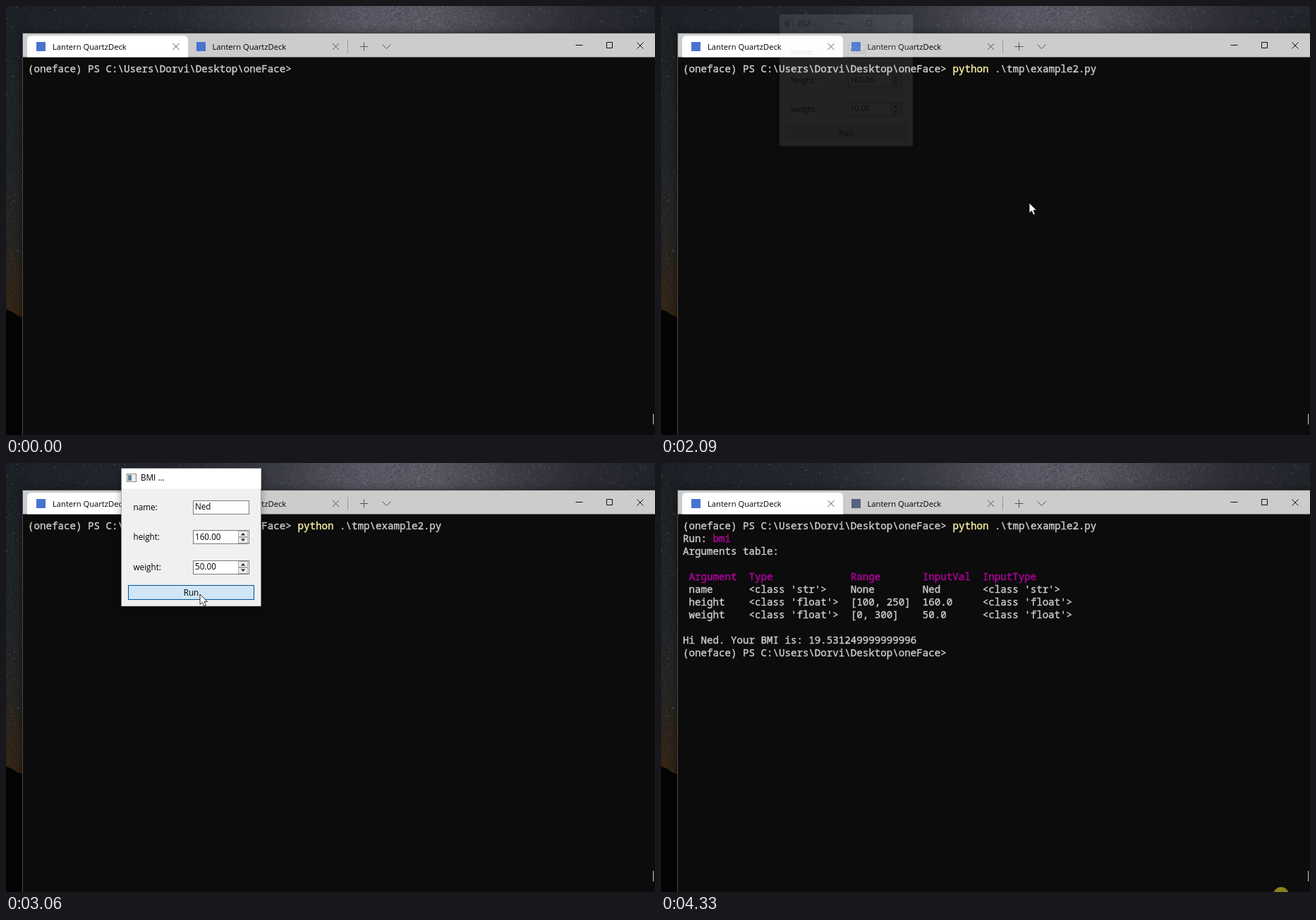
Recreate the animation shown at these times as an HTML page with a canvas. Size 920 by 608 pixels, loop 4400 ms.

```html
<!DOCTYPE html>
<html lang="en">
<head>
<meta charset="utf-8">
<title>Terminal and form</title>
<style>
  html, body { margin: 0; width: 100%; height: 100%; overflow: hidden; background: #000; }
  canvas, svg { position: absolute; left: 0; top: 0; width: 920px; height: 608px; }
  text { white-space: pre; }
  .ui { font: 11.2px "Open Sans", "Noto Sans", sans-serif; fill: #000; }
  .form { font: 11.7px "Open Sans", "Noto Sans", sans-serif; fill: #000; }
  .term {
    font: 500 14.167px "Noto Sans Mono", "DejaVu Sans Mono", monospace;
    color: #ccc; fill: currentColor; stroke-width: .4px;
  }
  .term text, .term tspan { fill: currentColor; stroke: currentColor; }
  .line { fill: none; stroke: #111; }
  .soft { fill: none; stroke: #555; }
  .box { fill: #fff; stroke: #7a7a7a; }
  .hot { color: #b4009e; }
  .cmd { color: #f9f1a5; }
  #win { filter: drop-shadow(0 1px 6px rgba(0, 0, 0, .55)); }
  #dialog { filter: drop-shadow(0 3px 6px rgba(0, 0, 0, .35)); }
</style>
</head>
<body>
<canvas id="sky" width="920" height="608"></canvas>
<svg viewBox="0 0 920 608">
  <defs>
    <path id="cross" d="M-4.5-4.5 4.5 4.5M-4.5 4.5 4.5-4.5"/>
    <g id="spin">
      <rect x="329.5" y="1.5" width="13" height="8" fill="#eee" stroke="#aaa"/>
      <rect x="329.5" y="10.5" width="13" height="8" fill="#eee" stroke="#aaa"/>
      <path d="M333 7.500h6l-3-3.500zM333 12.500h6l-3 3.500z" fill="#222"/>
    </g>
  </defs>

  <g id="win">
    <rect x="23" y="38" width="920" height="600" fill="#4a4a4a"/>
    <rect x="24" y="39" width="920" height="34" fill="#ccc"/>
    <rect x="24" y="72.500" width="920" height="560" fill="#0c0c0c"/>
  </g>
  <path d="M30 72.500V48q0-6 6-6h216q6 0 6 6v24.500z" fill="#fff"/>
  <rect x="43" y="51" width="13" height="13" fill="#4674cf"/>
  <rect id="icon2" x="270" y="51" width="13" height="13"/>
  <g class="ui">
    <text x="66" y="62">Lantern QuartzDeck</text>
    <text x="292.500" y="62">Lantern QuartzDeck</text>
  </g>
  <g class="soft">
    <use href="#cross" x="241" y="57.500"/>
    <use href="#cross" x="467.500" y="57.500"/>
    <path d="M501.500 57.500h12M507.500 51.500v12M533.500 54.500l6 6 6-6"/>
    <path d="M484.500 48v19" stroke="#999"/>
  </g>
  <g class="line">
    <path d="M807.500 55.500h10M851.500 51.500h8v8h-8z"/>
    <use href="#cross" x="899" y="56"/>
  </g>
  <rect x="917" y="578" width="1.200" height="15" fill="#bbb"/>

  <g id="term" class="term"></g>
  <rect id="caret" width="1.200" height="17" fill="#fff"/>

  <g id="dialog">
    <rect x="163.500" y="7.500" width="198" height="195.500" fill="#f0f0f0" stroke="#777" stroke-opacity=".5"/>
    <rect x="164" y="8" width="197.500" height="28.500" fill="#fff"/>
    <rect x="171.500" y="15.500" width="13" height="11" fill="#e8eef2" stroke="#888"/>
    <rect x="173" y="17" width="5" height="8" fill="#5f7f91"/>
    <g id="buttons" class="line">
      <path d="M249 21.500h10M292.500 16.500h8v8h-8z"/>
      <use href="#cross" x="340" y="21"/>
    </g>
    <rect id="name" class="box" x="265.500" y="53.500" width="79" height="19"/>
    <rect class="box" x="265.500" y="95.500" width="79" height="19"/>
    <rect class="box" x="265.500" y="138.500" width="79" height="19"/>
    <use href="#spin" y="95"/>
    <use href="#spin" y="138"/>
    <rect id="run" x="173.500" y="173.500" width="178" height="20"/>
    <g class="form">
      <text x="191" y="25">BMI ...</text>
      <text x="180.500" y="67">name:</text>
      <text x="180.500" y="109">height:</text>
      <text x="180.500" y="152">weight:</text>
      <text x="268" y="66">Ned</text>
      <text x="268" y="109">160.00</text>
      <text x="268" y="151">50.00</text>
      <text x="262.500" y="188" text-anchor="middle">Run</text>
    </g>
    <rect id="nameCaret" x="291" y="56" width="1" height="13"/>
  </g>

  <circle id="click" cx="879" cy="612" r="11" fill="#8a8120"/>
  <path id="mouse" d="M0 0V14.500L3.300 11.500 6 17.200 8.400 16.100 5.900 10.600H10.500Z"
        fill="#fff" stroke="#000" stroke-width=".8"/>
</svg>

<script>
const LOOP = 4400, COL = 8.5, ROW = 18, LEFT = 31, TOP = 80;
const $ = id => document.getElementById(id);
const show = (id, on) => $(id).setAttribute("visibility", on ? "visible" : "hidden");
const attrs = (id, values) => {
  for (const key in values) $(id).setAttribute(key, values[key]);
};

// Night sky: gradients, seeded grain and a dark hill
function paintSky() {
  const c = $("sky").getContext("2d");
  let seed = 7;
  const rnd = () => (seed = seed * 16807 % 2147483647) / 2147483647;
  const fade = (x, y, stops) => {
    const g = c.createLinearGradient(0, 0, x, y);
    stops.forEach(([at, color]) => g.addColorStop(at, color));
    return g;
  };
  c.fillStyle = fade(920, 0, [[0, "#1b2026"], [.25, "#23262d"], [.42, "#3a3b45"], [.55, "#575561"],
    [.66, "#585661"], [.78, "#3d3c46"], [.9, "#292932"], [1, "#212329"]]);
  c.fillRect(0, 0, 920, 60);
  c.fillStyle = fade(0, 608, [[0, "#1b2026"], [.3, "#1e2325"], [.5, "#232423"], [.6, "#29231d"],
    [.7, "#322315"], [.75, "#2c1d10"]]);
  c.fillRect(0, 0, 30, 608);
  const grain = (x, y) => {
    const glow = Math.exp(-(((x - 570) / 130) ** 2));
    const v = rnd() < .5 ? 0 : 225;
    c.fillStyle = `rgba(${v},${v},${v + 12},${rnd() * (.05 + .08 * glow)})`;
    c.fillRect(x, y, 1 + rnd(), 1 + rnd());
  };
  for (let i = 0; i < 14000; i++) grain(rnd() * 920, rnd() * 40);
  for (let i = 0; i < 4500; i++) grain(rnd() * 24, 40 + rnd() * 400);
  c.fillStyle = "rgba(190,205,225,.4)";
  for (let i = 0; i < 30; i++) c.fillRect(rnd() * 920, rnd() * 38, 1.2, 1.2);
  for (let i = 0; i < 12; i++) c.fillRect(rnd() * 23, rnd() * 370, 1.2, 1.2);
  c.fillStyle = "#040405";
  c.beginPath();
  [[0, 430], [8, 433], [15, 438], [30, 444], [30, 608], [0, 608]].forEach(p => c.lineTo(...p));
  c.fill();
}

const PROMPT = "(oneface) PS C:\\Users\\Dorvi\\Desktop\\oneFace&gt;";
const tableRow = (a, b, c, d, e) =>
  " " + a.padEnd(10) + b.padEnd(17) + c.padEnd(12) + d.padEnd(10) + e;
const plain = s => s.replace(/</g, "&lt;").replace(/>/g, "&gt;");
const dataRow = (name, type, range, value) =>
  plain(tableRow(name, `<class '${type}'>`, range, value, `<class '${type}'>`));
const hot = s => `<tspan class="hot">${s}</tspan>`;
const line = (row, html, col = 0) =>
  `<text x="${LEFT + col * COL}" y="${TOP + 14.4 + row * ROW}">${html}</text>`;

function buildTerminal() {
  const output = [
    "Run: " + hot("bmi"),
    "Arguments table:",
    "",
    hot(tableRow("Argument", "Type", "Range", "InputVal", "InputType")),
    dataRow("name", "str", "None", "Ned"),
    dataRow("height", "float", "[100, 250]", "160.0"),
    dataRow("weight", "float", "[0, 300]", "50.0"),
    "",
    "Hi Ned. Your BMI is: 19.531249999999996"
  ];
  $("term").innerHTML = line(0, PROMPT) +
    `<g id="command">${line(0, '<tspan class="cmd">python</tspan> .\\tmp\\example2.py', 45)}</g>` +
    `<g id="output">${output.map((s, i) => line(i + 1, s)).join("")}</g>` +
    `<g id="prompt">${line(10, PROMPT)}</g>`;
}

// The screen refreshes in even steps: first, last, count
const RUNS = [[460, 890, 7], [2090, 2570, 8], [2640, 3150, 8], [3210, 3730, 8], [3800, 4070, 5]];
function snap(t) {
  let s = 0;
  for (const [a, b, n] of RUNS) {
    if (t < a) break;
    const step = (b - a) / (n - 1);
    s = a + Math.floor((Math.min(t, b) - a) / step + 1e-6) * step;
  }
  return s;
}

// Pointer: time, x, y, and the power of the easing (0 = smooth)
const PATH = [[460, 844, 585, 0], [890, 522, 279, 1], [2400, 522, 279, 0], [2930, 275, 186, 1],
  [3400, 275, 186, 1.3], [3730, 553, 352, 1], [4002, 845, 587, 1], [4070, 879, 612, 1]];
function pointer(s) {
  const i = PATH.findIndex(k => k[0] > s);
  if (i < 1) return i ? PATH[PATH.length - 1].slice(1, 3) : PATH[0].slice(1, 3);
  const [a, b] = [PATH[i - 1], PATH[i]];
  const u = (s - a[0]) / (b[0] - a[0]);
  const e = a[3] ? u ** a[3] : u * u * (3 - 2 * u);
  return [a[1] + (b[1] - a[1]) * e, a[2] + (b[2] - a[2]) * e];
}

// Text caret: from time on, at column and row (none = hidden)
const CARET = [[0], [890, 45, 0], [1350], [1420, 69, 0], [1620, 0, 1], [2090],
  [3150, 0, 10], [3284, 45, 10], [4330]];

function dialogLevel(s) {
  if (s < 2090) return 0;
  const e = s < 3150 ? 1 - Math.exp((2083 - s) / 69) : Math.exp((3140 - s) / 22);
  return e < .01 ? 0 : Math.min(1, e);
}

function render(t) {
  const s = snap(t);
  show("command", t >= 1350);
  show("output", t >= 3150);
  show("prompt", t >= 3284);

  const [, col, row] = CARET.filter(k => k[0] <= t).pop();
  show("caret", col !== undefined);
  if (col !== undefined) attrs("caret", { x: LEFT + col * COL, y: TOP + row * ROW - .5 });

  const level = dialogLevel(s), scale = .95 + .05 * level;
  attrs("dialog", {
    display: level ? "inline" : "none",
    opacity: level,
    transform: `translate(262.5 105.25) scale(${scale}) translate(-262.5 -105.25)`
  });
  const hover = s >= 2925, pressed = t >= 3004;
  attrs("run", {
    fill: pressed ? "#d0e5f5" : hover ? "#e5f1fb" : "#dcdcdc",
    stroke: pressed ? "#005499" : hover ? "#0078d7" : "#adadad"
  });
  $("name").style.stroke = pressed ? "#7a7a7a" : "#0078d7";
  show("nameCaret", t < 2640);
  show("buttons", t < 3060);

  const [x, y] = pointer(s);
  attrs("mouse", { transform: `translate(${x} ${y})` });
  show("mouse", t >= 460 && t < 1620 || t >= 2090);
  show("click", t >= 4330);
  attrs("icon2", { fill: t >= 4330 ? "#56627f" : "#4674cf" });
}

paintSky();
buildTerminal();
const start = performance.now();
function frame() {
  render((performance.now() - start) % LOOP);
  requestAnimationFrame(frame);
}
frame();
</script>
</body>
</html>
```
